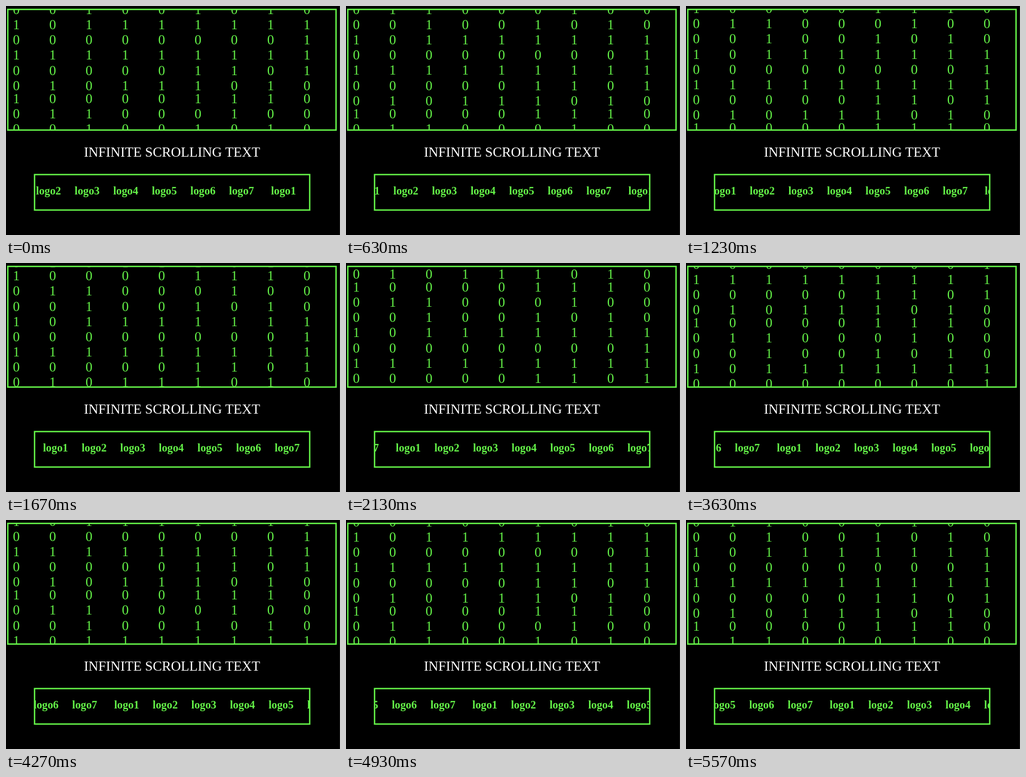
Animation of 616 by 424 pixels, one loop 5610 ms. Source, as an HTML page:

```html
<!DOCTYPE html>
<html lang="en">
<head>
<meta charset="utf-8">
<title>Infinite scrolling text</title>
<style>
  html, body { margin: 0; width: 100%; height: 100%; overflow: hidden; background: #000; }
  svg { display: block; width: 616px; height: 424px; --green: #64f248; }
  text { font-family: "Liberation Serif", "Times New Roman", serif; white-space: pre; }
  .digits { font-size: 25.2px; fill: var(--green); }
  .title { font-size: 25.25px; fill: #fff; }
  .logos { font-size: 20.3px; font-weight: bold; fill: var(--green); }
  .frame { fill: none; stroke: var(--green); stroke-width: 2.6px; }
  .edge { fill: #1a1a1a; }
</style>
</head>
<body>
<svg viewBox="0 0 616 424">
  <defs>
    <clipPath id="matrixClip"><rect x="4" y="7" width="604" height="222"/></clipPath>
    <clipPath id="logoClip"><rect x="53.5" y="313" width="506" height="64"/></clipPath>
  </defs>
  <rect class="edge" x="615" width="1" height="424"/>
  <g clip-path="url(#matrixClip)"><g id="digits" class="digits"></g></g>
  <rect class="frame" x="3.3" y="6.3" width="605.4" height="223.4"/>
  <text class="title" x="143.7" y="279.2">INFINITE SCROLLING TEXT</text>
  <g clip-path="url(#logoClip)"><g id="logos" class="logos"></g></g>
  <rect class="frame" x="52.7" y="312.1" width="507.4" height="65.7"/>
</svg>
<script>
const LOOP = 5610;
const FRAME_RATE = 0.03; // frames per ms
const LAST_FRAME = 167;

const ROWS = [
  "100001110", "011000100", "001001010", "101111111",
  "000000001", "111111111", "000001101", "010111010"
];
const matrix = { start: -41.5, pitch: 28.17, period: 221.2, duration: 5000 };
const ticker = { start: -15.9, pitch: 71.2, period: 504.6, duration: 10000 };

const digits = document.getElementById("digits");
const logos = document.getElementById("logos");
const columns = Array.from({ length: 9 }, (_, i) => 12.7 + 67 * i).join(" ");

function addText(parent, x, y, content) {
  const node = document.createElementNS("http://www.w3.org/2000/svg", "text");
  node.setAttribute("x", x);
  node.setAttribute("y", y);
  node.textContent = content;
  parent.append(node);
}

// Neighbouring copies keep each strip seamless while it scrolls.
for (let copy = -1; copy <= 1; copy++) {
  ROWS.forEach((row, i) =>
    addText(digits, columns, matrix.start + copy * matrix.period + i * matrix.pitch, row));
  for (let i = 0; i < 7; i++) {
    addText(logos, ticker.start + copy * ticker.period + i * ticker.pitch, 349, "logo" + (i + 1));
  }
}

function shift(strip, time) {
  return (time / strip.duration % 1) * strip.period;
}

function draw(now) {
  const frame = Math.min(LAST_FRAME, Math.floor((now % LOOP + 4) * FRAME_RATE));
  const time = frame / FRAME_RATE;
  digits.setAttribute("transform", `translate(0 ${shift(matrix, time).toFixed(2)})`);
  logos.setAttribute("transform", `translate(${shift(ticker, time).toFixed(2)} 0)`);
}

function tick() {
  draw(performance.now());
  requestAnimationFrame(tick);
}

draw(0);
requestAnimationFrame(tick);
</script>
</body>
</html>
```
